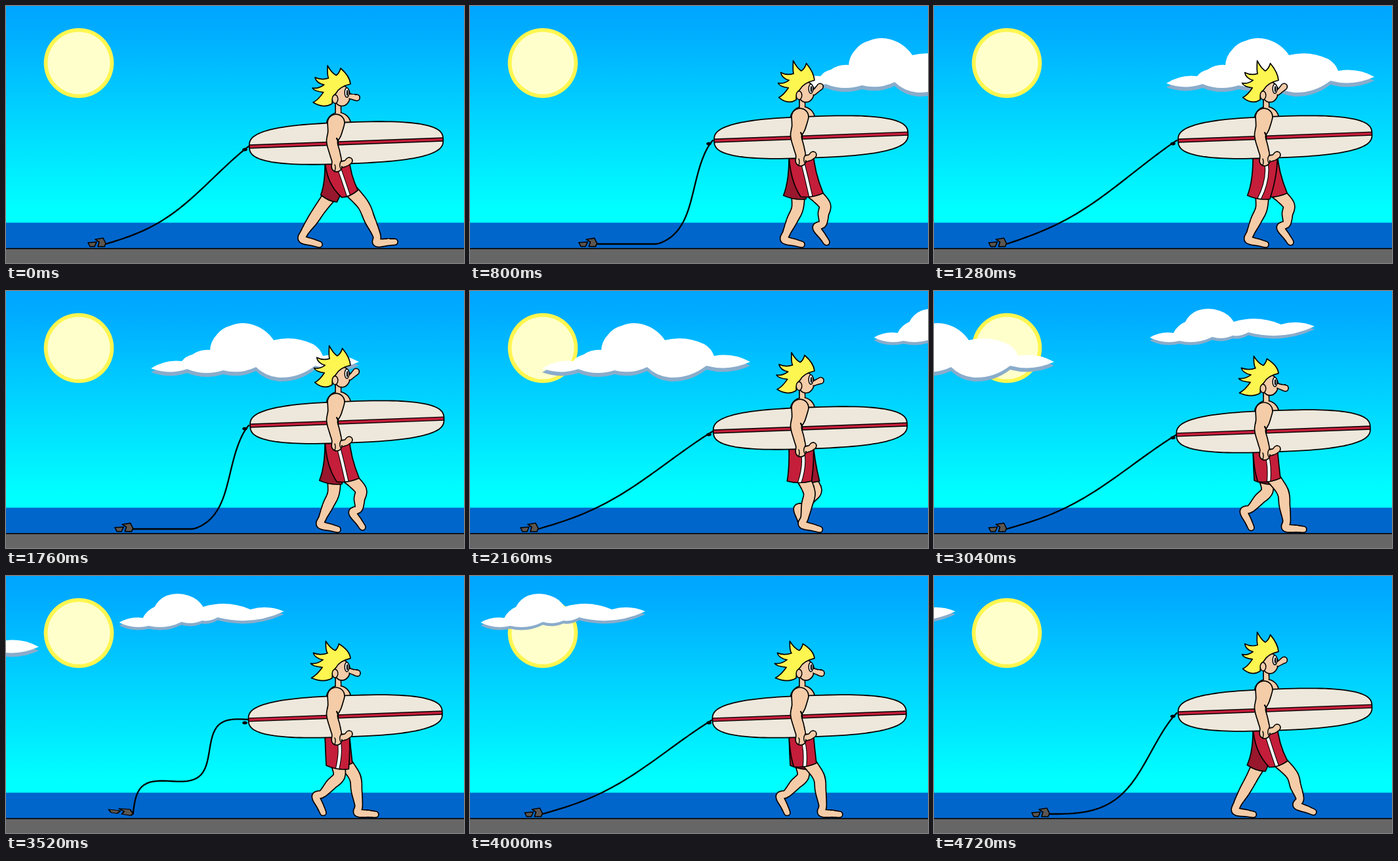
Write an HTML page with a canvas that moves like this. It is 698 px wide and 392 px high and loops after 4.8 s.

```html
<!DOCTYPE html>
<html lang="en">
<head>
<meta charset="utf-8">
<title>Surfer walking</title>
<style>
html, body { margin: 0; width: 100%; height: 100%; overflow: hidden; }
canvas { display: block; width: 698px; height: 392px; }
</style>
</head>
<body>
<canvas id="stage"></canvas>
<script>
const canvas = document.getElementById('stage');
const c = canvas.getContext('2d');
const dpr = window.devicePixelRatio || 1;
canvas.width = 698 * dpr;
canvas.height = 392 * dpr;
c.scale(dpr, dpr);
c.lineJoin = c.lineCap = 'round';

const { sin, cos, abs, max, min, sign, PI } = Math;
const STEP = 80, LOOP = 60, CYCLE = 12, GROUND = 369;
const INK = '#000', SKIN = '#f4cca8', RED = '#c41e3a', DARK = '#98172d';

const mix = (a, b, t) => a + (b - a) * t;
const mixPt = (p, q, t) => [mix(p[0], q[0], t), mix(p[1], q[1], t)];

// Periodic motion: mean, first cosine and sine, second cosine
const wave = (a, mean, c1, s1, c2 = 0) =>
  mean + c1 * cos(a) + s1 * sin(a) + c2 * cos(2 * a);

function paint(path, fill, width = 1.7) {
  if (fill) { c.fillStyle = fill; c.fill(path); }
  if (width) { c.strokeStyle = INK; c.lineWidth = width; c.stroke(path); }
}

function polygon(pts) {
  const p = new Path2D();
  pts.forEach(q => p.lineTo(...q));
  p.closePath();
  return p;
}

function oval(x, y, rx, ry, fill, width) {
  const p = new Path2D();
  p.ellipse(x, y, rx, ry, 0, 0, 7);
  paint(p, fill, width);
}

function stroke(x0, y0, cx, cy, x1, y1, width) {
  const p = new Path2D();
  p.moveTo(x0, y0);
  p.quadraticCurveTo(cx, cy, x1, y1);
  paint(p, null, width);
}

// Outlined limb of varying thickness through [x, y, r] points
function tube(pts) {
  const dots = [], last = pts.length - 1;
  for (let i = 0; i < last; i++) {
    const q = [pts[max(0, i - 1)], pts[i], pts[i + 1], pts[min(last, i + 2)]];
    for (let t = 0; t <= 1; t += 1 / 24) {
      dots.push([0, 1, 2].map(k => {
        const [a, b, d, e] = q.map(v => v[k]);
        return b + .5 * t * (d - a + t * (2 * a - 5 * b + 4 * d - e + t * (3 * (b - d) + e - a)));
      }));
    }
  }
  for (const [grow, fill] of [[.8, INK], [-.9, SKIN]]) {
    c.fillStyle = fill;
    c.beginPath();
    for (const [x, y, r] of dots) {
      c.moveTo(x + r + grow, y);
      c.arc(x, y, r + grow, 0, 7);
    }
    c.fill();
  }
}

function scenery() {
  const sky = c.createLinearGradient(0, 0, 0, 330);
  sky.addColorStop(0, '#00a5ff');
  sky.addColorStop(.12, '#00adff');
  sky.addColorStop(.94, '#00ffff');
  c.fillStyle = sky;
  c.fillRect(0, 0, 698, 331);
  c.fillStyle = '#0066cc';
  c.fillRect(0, 330.5, 698, 40);
  c.fillStyle = '#666';
  c.fillRect(0, 370, 698, 22);
  c.fillStyle = INK;
  c.fillRect(0, GROUND + .2, 698, 1.6);
  oval(111, 87, 53.3, 53.3, '#fff650', 0);
  oval(111, 87, 47.5, 47.5, '#ffffcc', 0);
}

// Closed outline whose edges all puff outwards
function puffs(text) {
  const pts = text.split(' ').map(s => s.split(',').map(Number));
  const p = new Path2D();
  p.moveTo(...pts[0]);
  pts.forEach(([x, y], i) => {
    const [u, v] = pts[(i + 1) % pts.length];
    p.quadraticCurveTo((x + u) / 2 + (v - y) * .18, (y + v) / 2 - (u - x) * .18, u, v);
  });
  return p;
}

const CLOUDS = [
  { x: 709, speed: .2773, shade: 6, shape: puffs('0,118 47,107 63,97 90,90 100,67 121,53 ' +
    '154,51 187,75 247,81 262,99 317,108 250,114 195,132 160,116 110,121 55,119') },
  { x: 1319.4, speed: .3258, shade: 4.5, shape: puffs('0,71 36,64 54,47 72,30 106,30 ' +
    '128,47 200,51 251,54 150,63 126,68 95,70 45,76') }
];

function clouds(time) {
  for (const k of CLOUDS) {
    c.save();
    c.translate(k.x - time * k.speed, k.shade);
    paint(k.shape, '#8aaccb', 0);
    c.translate(0, -k.shade);
    paint(k.shape, '#fff', 0);
    c.restore();
  }
}

// A sagging line that goes slack, then ripples, as the cuff is yanked along
function leash(a, dy) {
  const pulse = at => max(0, cos(a - at * PI / 6)) ** 4;
  const tail = [370, 214 + dy], end = [152 - 48 * sin(a), 363];
  const flat = pulse(8), ripple = 22 * flat;
  const sag = 16 + 52 * pulse(10) - ripple;
  const len = Math.hypot(end[0] - tail[0], end[1] - tail[1]);
  const nx = (end[1] - tail[1]) / len, ny = (tail[0] - end[0]) / len;
  const line = new Path2D();
  for (let u = 0; u <= 1.001; u += .02) {
    const off = sag * sin(PI * u ** 1.4) - ripple * sin(3 * PI * u);
    const [x, y] = mixPt(tail, end, u);
    line.lineTo(x + off * nx, min(y + off * ny, 363));
  }
  paint(line, null, 2.3);
  oval(tail[0] - 6, tail[1] + 5, 3.5, 2, INK, 1);

  c.save();
  c.translate(...end);
  c.rotate(flat * .15);
  c.scale(1 + flat * .4, 1 - flat * .3);
  paint(polygon([[-27, -2], [-14, -3], [-17, 4], [-24, 4]]), '#5c5650', 1.6);
  paint(polygon([[-16, -7], [-4, -9], [0, -1], [-2, 4], [-12, 4], [-10, -3]]), '#5c5650', 1.6);
  c.restore();
}

// Hip, knee and ankle swing with the stride; the foot rolls and never sinks
function leg(a) {
  const hip = [wave(a, 509, 13, -3), wave(a, 282, -4, 0)];
  const knee = [wave(a, 517, 32, -5, -5), wave(a, 305, -2.5, 2)];
  const ankle = [wave(a, 510, 55, 0), 350 - 21 * max(0, -sin(a))];
  const roll = wave(a, 26.5, -10, -29, -19) * PI / 180;
  const along = (p, d, turn) => [p[0] + d * cos(roll + turn), p[1] + d * sin(roll + turn)];
  const deep = along(along(ankle, 11, PI / 2), 28, 0)[1] + 5 - GROUND;
  ankle[1] -= max(0, deep);
  const heel = along(ankle, 11, PI / 2);
  const calf = mixPt(knee, ankle, .5);
  tube([[...hip, 10.5], [...knee, 9], [...calf, 8.3], [...ankle, 6],
    [...heel, 6.2], [...along(heel, 17, 0), 5.3], [...along(heel, 27, 0), 4.7]]);
}

function shorts(a, dy, fill, stripe) {
  const x = wave(a, 508, 16, -6), y = wave(a, 290, -3.5, 0);
  const w = wave(a, 15.5, 0, 0, -3.2), tilt = -5.5 * cos(a);
  const p = new Path2D();
  p.moveTo(486, 232 + dy);
  p.lineTo(523, 232 + dy);
  p.quadraticCurveTo(525, 258 + dy / 2, x + w, y + tilt);
  p.quadraticCurveTo(x, y + 5, x - w, y - tilt);
  p.quadraticCurveTo(487, 270 + dy / 2, 486, 232 + dy);
  p.closePath();
  paint(p, fill, 0);
  if (stripe) {
    c.save();
    c.clip(p);
    const s = new Path2D();
    s.moveTo(505, 240 + dy);
    s.quadraticCurveTo(513, 262, x - 1, y + 6);
    paint(s, null, 6.4);
    c.strokeStyle = '#fff';
    c.lineWidth = 4.2;
    c.stroke(s);
    c.restore();
  }
  paint(p);
}

// Five locks around the skull; each valley is pulled towards its centre
function hair(lift) {
  const tips = [[510, 95], [490, 91], [471, 109], [467, 125], [468, 147]]
    .map(([x, y]) => [x + 3 * lift, y - 2 * lift]);
  const p = new Path2D();
  p.moveTo(525, 119);
  p.quadraticCurveTo(524, 107, ...tips[0]);
  tips.forEach((tip, i) => {
    const next = tips[i + 1];
    if (!next) return;
    const dip = mixPt(mixPt(tip, next, .5), [508, 125], .4);
    const rise = mixPt(dip, next, .5);
    p.quadraticCurveTo(mix(tip[0], dip[0], .2) - 1, mix(tip[1], dip[1], .75), ...dip);
    p.quadraticCurveTo(rise[0], rise[1] + 4, ...next);
  });
  p.quadraticCurveTo(484, 157, 497, 149);
  p.quadraticCurveTo(497, 138, 503, 133);
  p.quadraticCurveTo(508, 123, 525, 119);
  p.closePath();
  paint(p, '#fdf550');
}

function head(a, dy) {
  const tip = 136.7 + 8 * sin(a + .4);
  c.save();
  c.translate(0, dy);
  oval(512, 137, 12.5, 15.5, SKIN);
  tube([[524, 138, 3.6], [529, mix(138, tip, .5), 4], [534.5 + sin(a), tip, 4.8]]);
  c.fillStyle = SKIN;
  c.fillRect(517, 135, 5.5, 7);
  hair(-sin(a));
  oval(501.5, 142, 4.3, 6.5, SKIN, 1.5);
  oval(519.5, 132, 3.3, 7.2, '#fff', 1.5);
  oval(520, 132.5, 1.2, 4.6, INK, 0);
  c.restore();
}

function torso() {
  const neck = new Path2D();
  neck.rect(502, 148, 8.5, 24);
  paint(neck, SKIN);
  oval(507, 181, 18.5, 18.5, SKIN);
  c.fillStyle = SKIN;
  c.fillRect(502.9, 158, 6.8, 8);
}

function board() {
  const edge = new Path2D();
  const round = v => sign(v) * abs(v) ** .72;
  for (let t = 0; t < 2 * PI; t += PI / 60) {
    edge.lineTo(147.8 * round(cos(t)), 31.5 * round(sin(t)));
  }
  edge.closePath();
  c.save();
  c.translate(518.5, 209);
  c.rotate(-.037);
  paint(edge, '#ede8db', 0);
  c.save();
  c.clip(edge);
  c.fillStyle = INK;
  c.fillRect(-150, -3.2, 300, 6.4);
  c.fillStyle = RED;
  c.fillRect(-150, -1.8, 300, 3.6);
  c.restore();
  paint(edge, null, 1.8);
  c.restore();
}

function arm() {
  tube([[510, 242, 5], [518, 240, 4.5], [523, 236, 5]]);
  tube([[503, 178, 13], [501, 193, 10.5], [497, 207, 8.5], [501, 224, 8], [504, 236, 7.5], [504, 245, 8]]);
  c.fillStyle = SKIN;
  c.fillRect(507, 238, 8, 6);
  stroke(501, 242, 503, 246, 501, 252, 1.4);
  stroke(511, 236, 507, 242, 510, 248, 1.4);
  stroke(504, 202, 507, 206, 506, 212, 2.2);
}

function draw(tick) {
  const a = tick % CYCLE * 2 * PI / CYCLE, b = a + PI;
  // The body dips and rises once per footfall
  const beat = 2 * a;
  const dy = 4 / 3 * (cos(beat) - cos(3 * beat)) + 8 * sin(beat);
  const sway = -1.5 * sin(beat);

  scenery();
  clouds(tick * STEP);
  leash(a, dy);
  leg(b);
  shorts(b, dy, cos(a) > 0 ? DARK : RED, false);
  leg(a);
  shorts(a, dy, RED, true);
  c.save();
  c.translate(0, dy);
  torso();
  c.restore();
  head(beat, .9 * dy + 1.5 - 1.5 * cos(beat));
  c.save();
  c.translate(sway, dy);
  board();
  c.translate(-sway, 0);
  arm();
  c.restore();
}

const start = performance.now();
let shown = -1;
function loop() {
  const tick = Math.floor((performance.now() - start) / STEP) % LOOP;
  if (tick !== shown) draw(shown = tick);
  requestAnimationFrame(loop);
}
loop();
</script>
</body>
</html>
```
